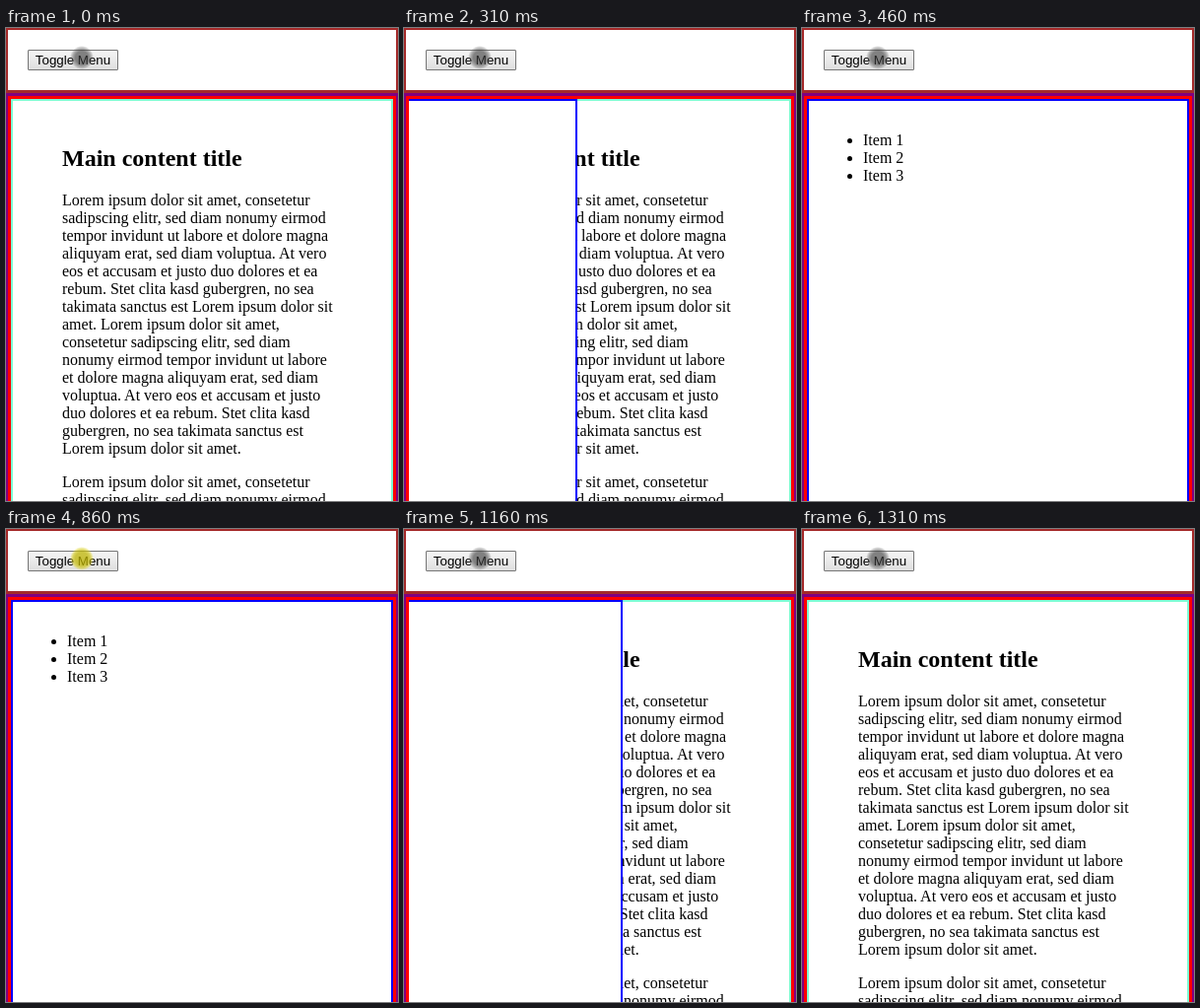
Animation, 398 px wide and 480 px high, one loop 1870 ms. Source, as an HTML page:

```html
<!DOCTYPE html>
<html lang="en">
<head>
<meta charset="utf-8">
<title>Toggle menu</title>
<style>
  * { box-sizing: border-box; }
  html, body { margin: 0; width: 100%; height: 100%; overflow: hidden; background: #fff; }
  body { position: relative; font: 16px/18px "Liberation Serif", "Times New Roman", serif; color: #000; }
  header, .outer, .inner, .slot, main, nav, #spot, button { position: absolute; }
  header { left: 0; top: 0; width: 398px; height: 66px; border: 2px solid brown; border-bottom-width: 3px; }
  button {
    left: 22px; top: 22px; width: 92px; height: 21px; padding: 0; margin: 0;
    border: 1px solid #767676; border-radius: 1px;
    background: linear-gradient(#f5f5f5, #dedede);
    font: 13.333px/19px "Liberation Sans", Arial, sans-serif; color: #000; text-align: center; white-space: nowrap;
  }
  button.active { border-color: #a6a6a6; background: linear-gradient(#dedede, #f3f3f3); }
  .outer { left: 0; top: 66px; width: 398px; height: 500px; background: purple; }
  .inner { left: 2px; top: 69px; width: 394px; height: 500px; background: red; }
  .slot { left: 5px; top: 72px; width: 388px; height: 500px; overflow: hidden; background: #fff; }
  main, nav { left: 0; top: 0; width: 388px; height: 500px; background: #fff; border: 2px solid aquamarine; }
  main { padding: 25px 50px; white-space: pre; }
  h2 { margin: 20px 0; font: bold 24px/27px "Liberation Serif", "Times New Roman", serif; }
  p { margin: 0 0 16px; }
  nav { padding: 15px; border-color: blue; }
  ul { margin: 16px 0; padding-left: 40px; }
  #spot {
    left: 65px; top: 18px; width: 24px; height: 24px; border-radius: 50%;
    background: radial-gradient(circle, rgba(60,60,60,.62) 0 6.5px, rgba(80,80,80,.45) 9px, rgba(110,110,110,.3) 10.5px, transparent 12px);
  }
  #spot.down {
    background: radial-gradient(circle, rgba(190,180,0,.74) 0 6.5px, rgba(205,195,10,.62) 9px, rgba(220,210,40,.4) 10.5px, transparent 12px);
  }
</style>
</head>
<body>
<header></header>
<div class="outer"></div>
<div class="inner"></div>
<div class="slot">
  <main></main>
  <nav id="menu"><ul><li>Item 1</li><li>Item 2</li><li>Item 3</li></ul></nav>
</div>
<button id="toggle">Toggle Menu</button>
<div id="spot"></div>
<script>
const LOOP = 1870, WIDTH = 388, LEAD = 34, DURATION = 318;
const OPEN = 150, CLOSE = 1000;
const STEPS = [0, 80, 160, 230, 310];

const lorem = `Lorem ipsum dolor sit amet, consetetur
sadipscing elitr, sed diam nonumy eirmod
tempor invidunt ut labore et dolore magna
aliquyam erat, sed diam voluptua. At vero
eos et accusam et justo duo dolores et ea
rebum. Stet clita kasd gubergren, no sea
takimata sanctus est Lorem ipsum dolor sit
amet. Lorem ipsum dolor sit amet,
consetetur sadipscing elitr, sed diam
nonumy eirmod tempor invidunt ut labore
et dolore magna aliquyam erat, sed diam
voluptua. At vero eos et accusam et justo
duo dolores et ea rebum. Stet clita kasd
gubergren, no sea takimata sanctus est
Lorem ipsum dolor sit amet.`;
document.querySelector("main").innerHTML =
  `<h2>Main content title</h2><p>${lorem}</p><p>${lorem}</p>`;

const menu = document.getElementById("menu");
const spot = document.getElementById("spot");
const toggle = document.getElementById("toggle");

// cubic-bezier(.42, 0, 1, 1)
function easeIn(x) {
  if (x >= 1) return 1;
  let lo = 0, hi = 1;
  for (let i = 0; i < 20; i++) {
    const u = (lo + hi) / 2;
    const bx = 1.26 * u * (1 - u) ** 2 + 3 * u * u * (1 - u) + u ** 3;
    if (bx < x) lo = u; else hi = u;
  }
  return lo * lo * (3 - 2 * lo);
}

// Slide progress, held between the coarse redraw steps
function slide(t) {
  if (t < 0) return 0;
  const held = STEPS.filter(s => s <= t).pop();
  return easeIn((held + LEAD) / DURATION);
}

const within = (t, from, to) => t >= from && t < to;

function draw(now) {
  const t = now % LOOP;
  const shown = slide(t - OPEN) - slide(t - CLOSE);
  menu.style.transform = `translateX(${Math.round(WIDTH * (shown - 1))}px)`;
  spot.className = within(t, 80, OPEN) || within(t, 860, CLOSE) ? "down" : "";
  toggle.className = within(t, OPEN, OPEN + 80) || within(t, CLOSE, CLOSE + 80) ? "active" : "";
}

const start = performance.now();
function frame() {
  draw(performance.now() - start);
  requestAnimationFrame(frame);
}
frame();
</script>
</body>
</html>
```
